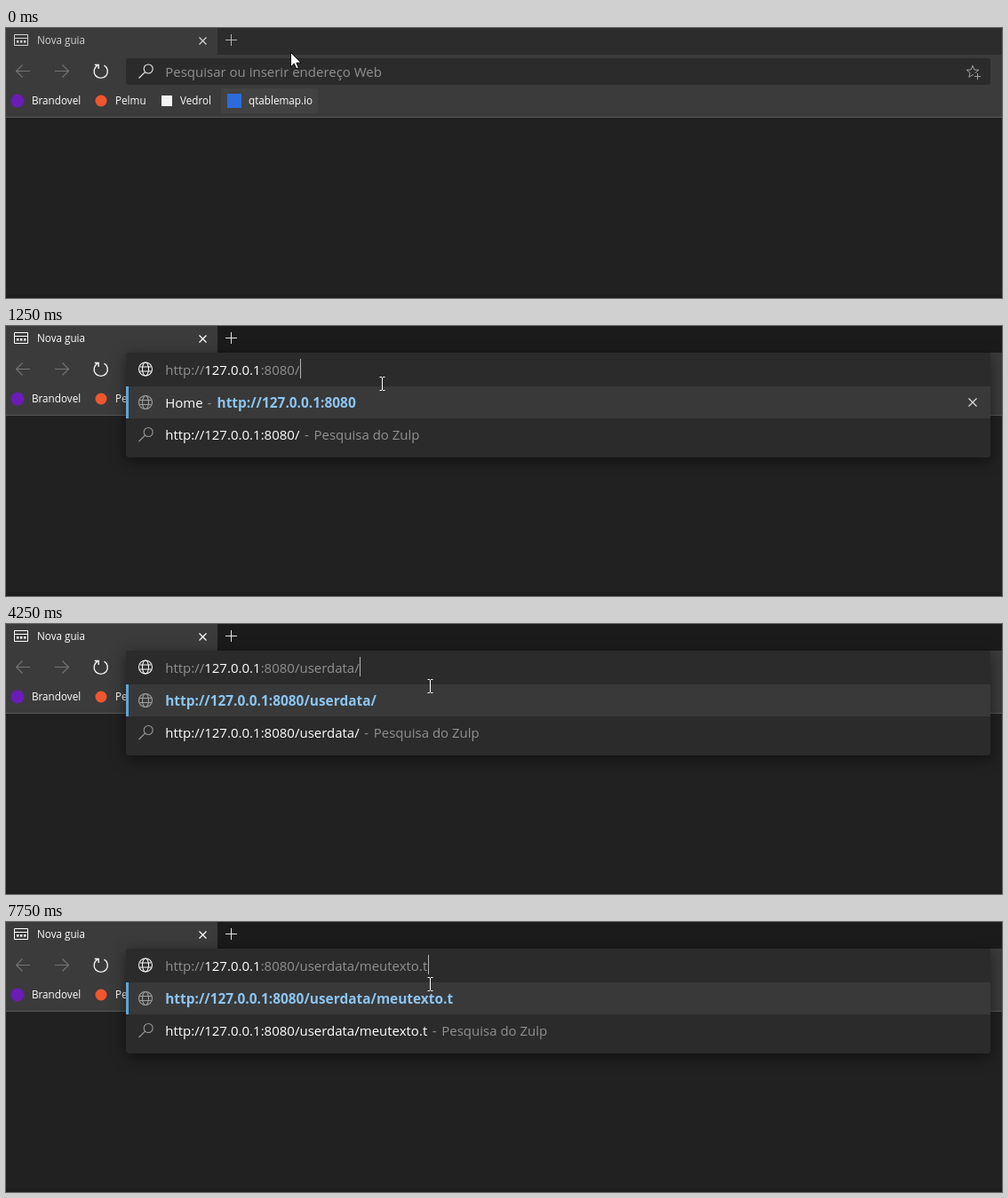
These frames come from a looping animation (1121 by 304 pixels, 8000 ms). An HTML page with a canvas:

```html
<!DOCTYPE html>
<html lang="pt">
<head>
<meta charset="utf-8">
<title>Nova guia</title>
<style>
html, body { margin: 0; width: 100%; height: 100%; overflow: hidden; background: #212121; }
canvas { display: block; width: 1121px; height: 304px; }
</style>
</head>
<body>
<canvas id="stage" width="1121" height="304"></canvas>
<script>
const ctx = document.getElementById('stage').getContext('2d');
const LOOP = 8000;
const FACE = '"Open Sans", "Noto Sans", sans-serif';
const SMALL = '11.7px ' + FACE;
const BODY = '15px ' + FACE;
const BOLD = 'bold 15.45px ' + FACE;
const WHITE = '#ffffff', GREY = '#919191', BLUE = '#8cc5f2', ACCENT = '#5ea5d9';
const TEXT_X = 179.2;

// time, text typed in the bar, text shown in the suggestions
const EDITS = [
  [1250, '', ''],
  [2750, 'u', 'u'],
  [3000, 'use', 'use'],
  [3250, 'userd', 'userd'],
  [3500, 'userdata', 'userdata'],
  [4000, 'userdata/', 'userdata'],
  [4250, 'userdata/', 'userdata/'],
  [4750, 'userdata/m', 'userdata/m'],
  [5000, 'userdata/meu', 'userdata/meu'],
  [5500, 'userdata/meut', 'userdata/meut'],
  [5750, 'userdata/meute', 'userdata/meute'],
  [6250, 'userdata/meutext', 'userdata/meutext'],
  [6750, 'userdata/meutexto', 'userdata/meutexto'],
  [7000, 'userdata/meutexto.', 'userdata/meutexto.'],
  [7750, 'userdata/meutexto.t', 'userdata/meutexto.t']
];

// time, x, y of the pointer
const POINTER = [
  [0, 320, 27], [250, 356, 24], [500, 366, 51], [750, 367, 52],
  [1000, 381, 62], [1250, 423, 65], [1500, 475, 70], [1750, 477, 70]
];

const latest = (steps, t) => steps.filter(s => s[0] <= t).pop();

function rect(x, y, w, h, color) {
  ctx.fillStyle = color;
  ctx.fillRect(x, y, w, h);
}

function round(x, y, w, h, r, color) {
  ctx.fillStyle = color;
  ctx.beginPath();
  ctx.roundRect(x, y, w, h, r);
  ctx.fill();
}

function disc(x, y, r, color) {
  ctx.fillStyle = color;
  ctx.beginPath();
  ctx.arc(x, y, r, 0, Math.PI * 2);
  ctx.fill();
}

function stroke(path, color, width = 1) {
  ctx.strokeStyle = color;
  ctx.lineWidth = width;
  ctx.stroke(new Path2D(path));
}

// Writes a run of text and returns where it ends.
function write(str, x, y, color, font = BODY) {
  ctx.font = font;
  ctx.fillStyle = color;
  ctx.fillText(str, x, y);
  return x + ctx.measureText(str).width;
}

function cross(x, y, r, color) {
  stroke(`M${x - r} ${y - r}L${x + r} ${y + r}M${x + r} ${y - r}L${x - r} ${y + r}`, color, 1.2);
}

function lens(y, color) {
  stroke(`M165.2 ${y - 2.5}a5 5 0 1 1 -10 0a5 5 0 1 1 10 0M156.5 ${y + 1.2}L149.5 ${y + 8}`, color, 1.1);
}

function globe(y, color) {
  ctx.strokeStyle = color;
  ctx.lineWidth = 1.1;
  for (const rx of [7.5, 3.5]) {
    ctx.beginPath();
    ctx.ellipse(157, y, rx, 7.5, 0, 0, Math.PI * 2);
    ctx.stroke();
  }
  stroke(`M150.3 ${y - 2.5}H163.7M150.3 ${y + 2.5}H163.7`, color, 1);
}

function star() {
  const pts = [];
  for (let i = 0; i < 10; i++) {
    const r = i % 2 ? 3.1 : 7.2, a = i * Math.PI / 5 - Math.PI / 2;
    pts.push((1088 + r * Math.cos(a)).toFixed(2) + ' ' + (49.5 + r * Math.sin(a)).toFixed(2));
  }
  stroke('M' + pts.join('L') + 'Z', '#a2a2a2');
  rect(1089, 51, 8, 7, '#2b2b2b');
  stroke('M1090 54.5H1097M1093.5 51V58', '#a2a2a2');
}

function tabs(active) {
  const ink = active ? WHITE : '#d2d2d2';
  rect(0, 0, 1121, 30, active ? '#1b1b1b' : '#2c2c2c');
  rect(0, 0, 238, 30, '#3b3b3b');
  stroke('M9.5 7.5H24.5V19.5H9.5ZM9.5 11.5H24.5', ink);
  for (const x of [12, 16, 20]) rect(x, 14, 2.4, 2.6, ink);
  write('Nova guia', 35, 18, ink, SMALL);
  cross(221.5, 14.5, 4, ink);
  stroke('M247 13.5H260M253.5 7V20', active ? '#e4e4e4' : '#b4b4b4');
}

function toolbar(hoverMark) {
  rect(0, 30, 1121, 70, '#3b3b3b');
  rect(0, 100, 1121, 1, '#565956');
  stroke('M27 48.5H11.5M18.5 41.5L11.5 48.5L18.5 55.5', '#757575', 1.1);
  stroke('M55 48.5H70.5M63.5 41.5L70.5 48.5L63.5 55.5', '#757575', 1.1);
  stroke('M103 42.2A7.6 7.6 0 1 0 110.5 42.2M99.8 41.5H104.2V46', '#f2f2f2', 1.4);

  if (hoverMark) round(242, 68, 109, 28, 2, '#424242');
  disc(13, 82, 7.5, '#6a1cb8');
  disc(107, 82, 6.5, '#f0562f');
  rect(175, 76, 12, 12, '#f4f4f4');
  rect(249, 74, 16, 16, '#2b6bdc');
  const labels = [['Brandovel', 29], ['Pelmu', 123], ['Vedrol', 196], ['qtablemap.io', 273]];
  for (const [name, x] of labels) write(name, x, 86, WHITE, SMALL);
}

function bar(focused, hover) {
  round(135, 34, 973, 30, 3, hover ? '#323232' : '#2b2b2b');
  if (focused) {
    ctx.strokeStyle = ACCENT;
    ctx.lineWidth = 2;
    ctx.beginPath();
    ctx.roundRect(135, 34, 973, 30, 3);
    ctx.stroke();
    rect(179, 38, 1, 21, WHITE);
  } else {
    write('Pesquisar ou inserir endereço Web', TEXT_X, 55, GREY);
  }
  lens(48.5, '#f0f0f0');
  star();
}

function dropdown(t) {
  const [since, typed, shown] = latest(EDITS, t);
  const host = 'http://127.0.0.1:8080';

  ctx.save();
  ctx.shadowColor = 'rgba(0,0,0,0.5)';
  ctx.shadowBlur = 16;
  ctx.shadowOffsetY = 4;
  round(135, 30, 973, 118, [2, 2, 4, 4], '#2b2b2b');
  ctx.restore();
  rect(135, 68, 973, 36, '#393939');
  rect(135, 68, 3, 36, ACCENT);

  globe(48.5, '#f4f4f4');
  let x = write('http://', TEXT_X, 55, GREY);
  x = write('127.0.0.1', x, 55, WHITE);
  x = write(':8080/' + typed, x, 55, GREY);
  const caretOn = Math.floor((t - since) / 500) % 2 === 0;
  if (caretOn) rect(Math.round(x + 0.3), 37, 1, 22, '#b4b4b4');

  globe(86, '#a0a0a0');
  if (shown) {
    write(host + '/' + shown, TEXT_X, 92, BLUE, BOLD);
  } else {
    write('Home', TEXT_X, 92, WHITE);
    write('-', 226.5, 92, GREY);
    write(host, 237.5, 92, BLUE, BOLD);
    cross(1088, 86, 4.5, '#e0e0e0');
  }

  lens(122, '#9a9a9a');
  x = write(host + '/' + shown, TEXT_X, 128, WHITE);
  write('-', x + 5.5, 128, GREY);
  write('Pesquisa do Zulp', x + 16, 128, GREY);
}

function arrow(x, y) {
  const p = new Path2D('M.5 .5V16.8L4.3 13.2L6.8 18.9L9.3 17.8L6.9 12.2H12Z');
  ctx.save();
  ctx.translate(x, y);
  ctx.fillStyle = WHITE;
  ctx.fill(p);
  ctx.strokeStyle = '#000';
  ctx.lineWidth = 1;
  ctx.stroke(p);
  ctx.restore();
}

function beam(x, y) {
  const c = x + 0.5;
  stroke(`M${c} ${y - 7}V${y + 7}M${c - 3} ${y - 7.5}H${c - 0.5}M${c + 0.5} ${y - 7.5}H${c + 3}` +
    `M${c - 3} ${y + 7.5}H${c - 0.5}M${c + 0.5} ${y + 7.5}H${c + 3}`, WHITE);
}

function draw(t) {
  rect(0, 0, 1121, 304, '#212121');
  rect(0, 300, 1121, 4, '#1d1d1d');
  tabs(t >= 750);
  toolbar(t < 250);
  if (t < 1250) bar(t >= 750, t >= 500 && t < 750);
  else dropdown(t);
  const [, x, y] = latest(POINTER, t);
  (t < 500 ? arrow : beam)(x, y);
}

let start;
function tick(now) {
  start ??= now;
  draw(Math.max(0, now - start) % LOOP);
  requestAnimationFrame(tick);
}
draw(0);
requestAnimationFrame(tick);
</script>
</body>
</html>
```
